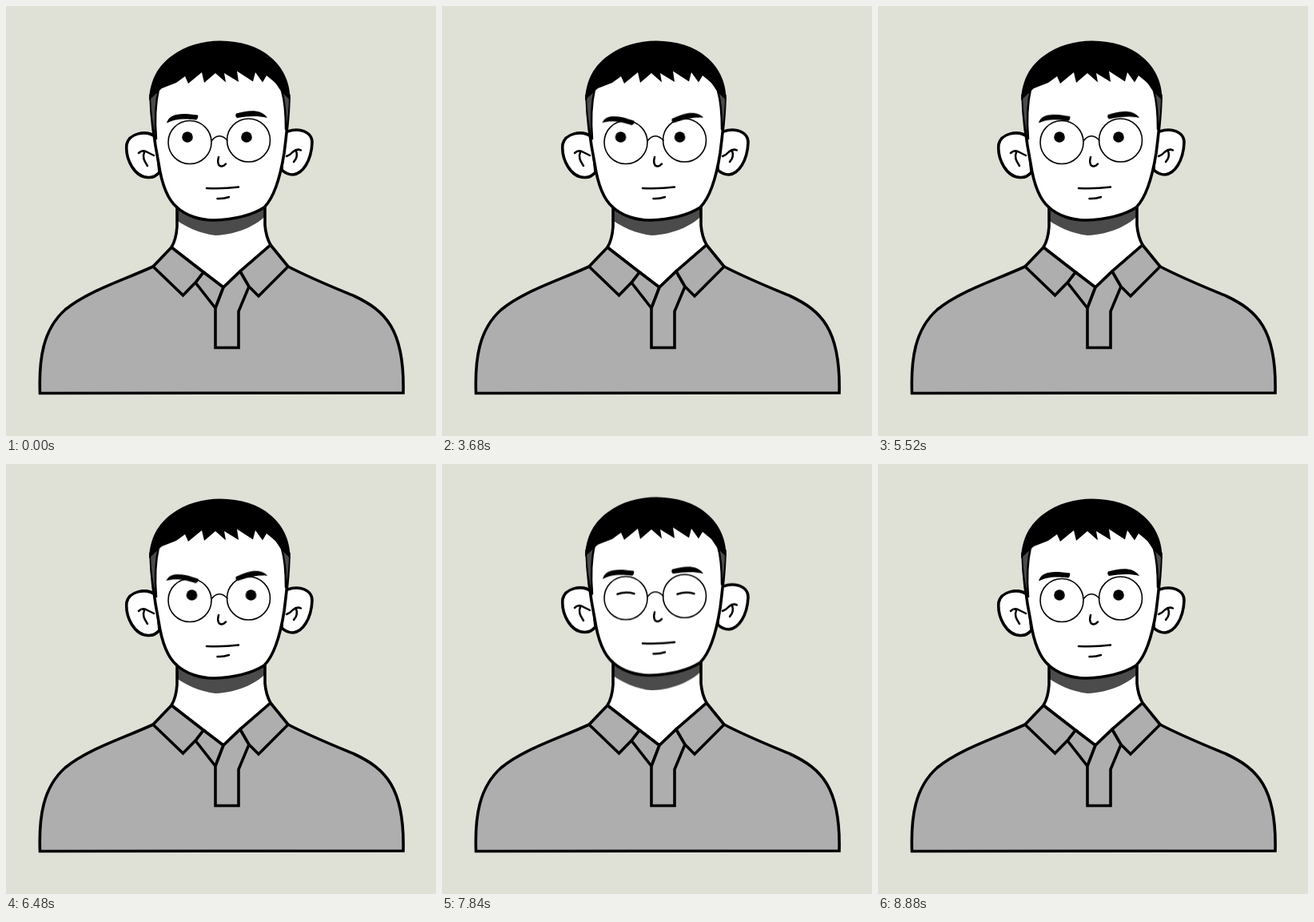
These frames come from a looping animation (538 by 538 pixels, 10000 ms). An HTML page without scripts:

```html
<!DOCTYPE html>
<html lang="en">
<head>
<meta charset="utf-8">
<title>Portrait</title>
<style>
html, body { margin: 0; width: 100%; height: 100%; overflow: hidden; background: #dfe0d6; }
svg { display: block; width: 100%; height: 100%; }
.ink { stroke: #000; stroke-width: 3.6; stroke-linejoin: round; stroke-linecap: round; }
.sharp { stroke-linejoin: miter; }
.shirt { fill: #aeaeae; }
.skin { fill: #fff; }
.shade { fill: #4b4b4b; }
.line { fill: none; stroke: #000; stroke-width: 2.5; stroke-linecap: round; }
.thin { stroke-width: 1.6; }

.nod, .brows, .brow, .pupils, .open, .shut { animation: 10s ease-in-out infinite; }
.nod { --k: 1; animation-name: nod; }
.ears { --k: 1.15; }
.eyes { --k: .75; }
.hair { --k: .6; }
.brows { animation-name: lift; }
.brow { animation-name: frown; }
.left { --tilt: 11deg; transform-origin: 203px 143px; }
.right { --tilt: -10deg; transform-origin: 325px 139px; }
.pupils { animation-name: glance; }
.open { animation-name: open; animation-timing-function: step-end; }
.shut { animation-name: shut; animation-timing-function: step-end; }

@keyframes lift {
  0%, 6.4%, 20%, 100% { transform: none; }
  10.4%, 16.8% { transform: translateY(-9.5px); }
}
@keyframes frown {
  0%, 28%, 56.4%, 69.6%, 100% { transform: rotate(0deg); }
  32%, 52.8%, 60%, 65.6% { transform: rotate(var(--tilt)); }
}
@keyframes glance {
  0%, 34.4%, 41.6%, 42.4%, 50.4%, 56.8%, 69.6%, 100% { transform: translateX(0); }
  37.6%, 38.4%, 60%, 60.8% { transform: translateX(-4px); }
  46.4%, 65.6% { transform: translateX(6px); }
}
/* --k sets how far each layer follows the nod */
@keyframes nod {
  0%, 72.8% { transform: translateY(0); animation-timing-function: ease-in; }
  74.4% { transform: translateY(calc(1.6px * var(--k))); animation-timing-function: ease-out; }
  76% { transform: translateY(calc(6px * var(--k))); }
  79.2% { transform: translateY(calc(-5px * var(--k))); animation-timing-function: ease-in; }
  82.4% { transform: translateY(calc(2.4px * var(--k))); animation-timing-function: ease-out; }
  83.6% { transform: translateY(calc(6px * var(--k))); }
  85.6%, 100% { transform: translateY(0); }
}
@keyframes open { 0%, 88.8%, 100% { opacity: 1; } 73.6% { opacity: 0; } }
@keyframes shut { 0%, 88.8%, 100% { opacity: 0; } 73.6% { opacity: 1; } }
</style>
</head>
<body>
<svg viewBox="0 0 538 538">
  <defs>
    <path id="neck" d="M214 240V276Q213 292 207 302L247 333 272 352 293 332 331 299Q325 288 324 274V240Z"/>
    <clipPath id="inNeck"><use href="#neck"/></clipPath>
  </defs>

  <path class="ink sharp shirt" d="M42.500 484.500C41 442 46 405 74 380C102 357 142 345 184 326H353C382 341 412 353 436 363C474 381 499 404 497 484Z"/>
  <use href="#neck" class="skin"/>
  <g clip-path="url(#inNeck)">
    <path class="nod shade" d="M205 235H335V252C318 274 290 286 262 287C244 285 224 277 205 262Z"/>
  </g>
  <use href="#neck" class="ink" fill="none"/>

  <g class="ink sharp shirt">
    <path d="M247 333L272 352 262 378 237 346Z"/>
    <path d="M293 332L304 351 291 382V427.500H262V378L272 352Z"/>
    <path d="M207 302L184 326 221.500 362 237 346 247 333Z"/>
    <path d="M331 299L353 326 316 363 304 351 293 332Z"/>
  </g>

  <g class="nod ears">
    <g class="ink skin">
      <path d="M188 164C174 154 154 160 151 173C149 192 161 214 178 214.500Q186 215 192 208Z"/>
      <path d="M347 160C359 151 383 154 383 171C382 194 371 210 359 211Q351 211 345 205Z"/>
    </g>
    <g class="line">
      <path d="M166 184Q171 179 177 183L185 187M173 183C170 190 174 195 177 200"/>
      <path d="M351 188Q356 186 359 182.500Q364 178 369 180.500M363 181C365 187 363 192 360 195"/>
    </g>
  </g>

  <g class="nod">
    <path class="ink skin" d="M181 112C182 150 187 177 191 197C195 224 202 242 214 252C225 262 242 268 260 268C286 267 309 261 323 252C337 238 344 209 348 184C351 160 354 138 354 112L320 75H215Z"/>
    <path class="shade" d="M181 114L191 102C187 122 186 142 188 166Q182 142 181 114Z"/>
    <path class="shade" d="M354 112L345 105C349 120 350 137 350 154Q354 134 354 112Z"/>
    <path class="line" d="M191 104C187 122 186 143 188 166M345 106C349 120 350 137 350 154"/>
    <g class="line">
      <path d="M266 189C264 196 266 201 270 200.500Q273 200 275 197.500"/>
      <path d="M251 228Q272 229 291 226.500"/>
      <path d="M264.500 241Q272 241.500 279 239"/>
    </g>
  </g>

  <path class="nod hair" d="M179 118C180 92 191 74 208 62C224 50 246 43.500 268 43.500C294 44 315 50 331 64C347 77 356 97 355.500 118L345 108 337 96 326 87 321 95.500 312 83 309 94.500 289 81.500 291 95 273 84 275 95.500 262 84 248 96 245 83 228 97 224 88 213 96 195 103Z"/>

  <g class="nod eyes">
    <g class="brows">
      <path class="brow left" d="M201 146.500C204 135 217 133 240 136.500Q241 140 238 142.500C220 140 210 142 201 146.500Z"/>
      <path class="brow right" d="M288 134.500C304 130 320 129 327 140C314 137 303 138 289 140Q286 138 288 134.500Z"/>
    </g>
    <g class="open">
      <g class="pupils">
        <circle cx="227" cy="164" r="6.800"/>
        <circle cx="301" cy="164" r="6.800"/>
      </g>
    </g>
    <path class="line shut" d="M219.500 165.500Q230 162 240.500 165M294.500 165.500Q305 162 315.500 165"/>
    <g class="line thin">
      <circle cx="230" cy="170.500" r="27"/>
      <circle cx="303.500" cy="168" r="27"/>
      <path d="M257 169Q266 157 277 168"/>
    </g>
  </g>
</svg>
</body>
</html>
```
